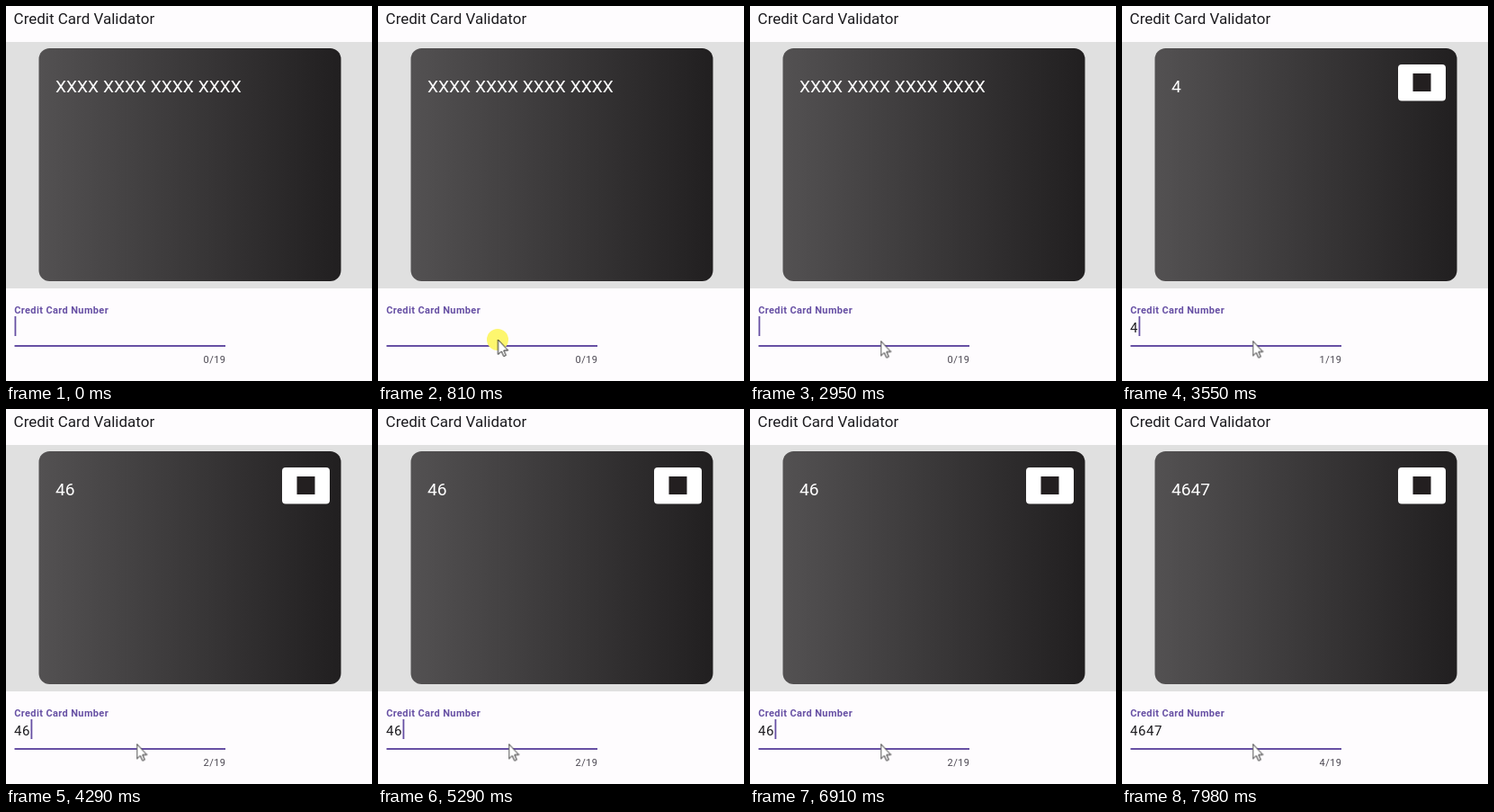
These frames come from a looping animation (407x417 px, 8 s). An HTML page:

```html
<!DOCTYPE html>
<html lang="en">
<head>
<meta charset="utf-8">
<title>Credit Card Validator</title>
<style>
  html, body { margin: 0; width: 100%; height: 100%; overflow: hidden; background: #fefcfe; }
  svg { display: block; width: 407px; height: 417px; font-family: Roboto, sans-serif; }
  .accent { fill: #6750a4; }
  .title { font-size: 17px; fill: #1c1b1f; }
  .card-no { font-size: 19.2px; fill: #fff; }
  .label { font-size: 11px; font-weight: 700; letter-spacing: .37px; }
  .field { font-size: 15px; letter-spacing: .6px; fill: #1c1b1f; }
  .count { font-size: 11px; letter-spacing: .4px; fill: #49454f; }

  #pointer { animation: move 8s infinite; }
  #click { opacity: 0; animation: click 8s step-end infinite; }
  @keyframes move {
    0%, .875% { transform: translate(272px, 420px); animation-timing-function: ease-out; }
    7.625%, 11% { transform: translate(133.5px, 371px); animation-timing-function: ease-in-out; }
    13.5%, 100% { transform: translate(145.5px, 372.5px); }
  }
  @keyframes click {
    0% { opacity: 0; }
    10.1% { opacity: 1; }
    11.8% { opacity: 0; }
  }
</style>
</head>
<body>
<svg viewBox="0 0 407 417">
  <defs>
    <linearGradient id="dark">
      <stop offset="0" stop-color="#535152"/>
      <stop offset=".5" stop-color="#3a3839"/>
      <stop offset="1" stop-color="#211f20"/>
    </linearGradient>
  </defs>

  <text class="title" x="8.6" y="20">Credit Card Validator</text>

  <rect y="40" width="407" height="274" fill="#e0e0e0"/>
  <rect x="36.5" y="47" width="336" height="259" rx="12" fill="url(#dark)"/>
  <text class="card-no" id="cardNo" x="55" y="95.5"></text>
  <g id="badge">
    <rect x="307" y="65" width="53" height="40.5" rx="4" fill="#fff"/>
    <rect x="323.5" y="75" width="20" height="20" fill="#231f20"/>
  </g>

  <text class="label accent" x="9.2" y="342">Credit Card Number</text>
  <text class="field" id="field" x="9" y="363"></text>
  <rect class="accent" id="caret" x="9.5" y="345" width="1.8" height="22"/>
  <rect class="accent" x="9.5" y="377" width="234.5" height="2"/>
  <text class="count" id="count" x="244.3" y="397" text-anchor="end"></text>

  <circle id="click" cx="133" cy="371" r="12" fill="#fdf66e"/>
  <path id="pointer" d="M0 0V16.5L3.8 13L6.3 18.6L8.8 17.5L6.4 12H11.2Z"
        fill="#fff" stroke="#222" stroke-width="1" stroke-linejoin="round"/>
</svg>
<script>
  const LOOP = 8000, BLINK = 490, PITCH = 9;
  // Each entry restarts the caret blink: [time, value]
  const edits = [
    [0, ''], [980, ''], [3350, '4'], [4190, '46'],
    [5730, '466'], [6500, '46'], [7000, '464'], [7480, '4647']
  ];
  const el = id => document.getElementById(id);
  const [cardNo, field, caret, count, badge] =
    ['cardNo', 'field', 'caret', 'count', 'badge'].map(el);
  const show = (node, on) => node.setAttribute('visibility', on ? 'visible' : 'hidden');

  function draw(t) {
    const [start, value] = edits.filter(e => e[0] <= t).pop();
    const n = value.length;
    cardNo.textContent = value || 'XXXX XXXX XXXX XXXX';
    field.textContent = value;
    count.textContent = n + '/19';
    caret.setAttribute('x', 9.5 + PITCH * n);
    // The first blink phase stays off until the field is clicked
    const lit = start === 0 ? t < BLINK : Math.floor((t - start) / BLINK) % 2 === 0;
    show(caret, lit);
    show(badge, n > 0);
  }

  let origin;
  function tick(now) {
    origin ??= now;
    draw((now - origin) % LOOP);
    requestAnimationFrame(tick);
  }
  draw(0);
  requestAnimationFrame(tick);
</script>
</body>
</html>
```
